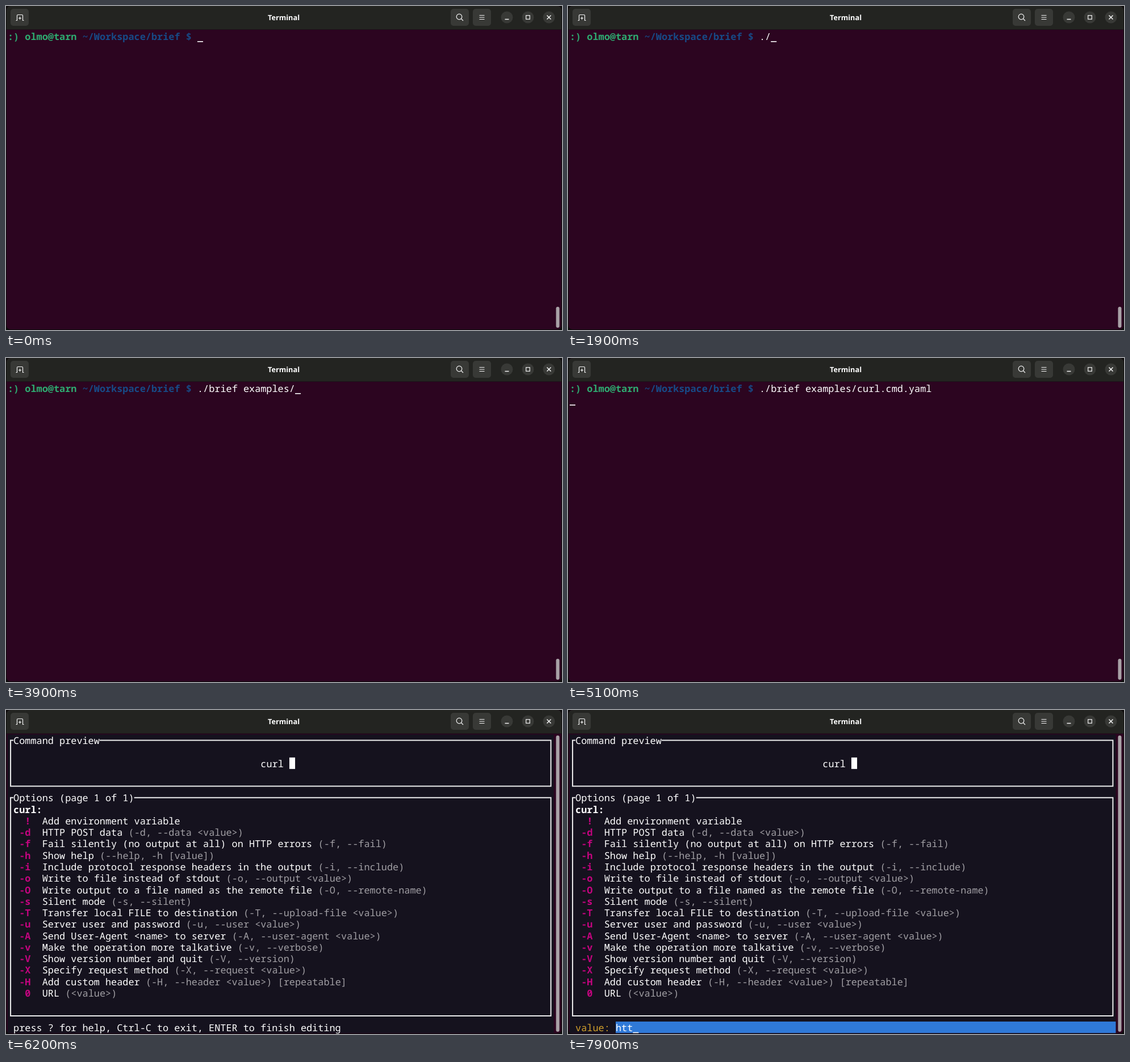
Recreate the animation shown at these times as an HTML page. Size 979x572 px, loop 8 s.

```html
<!DOCTYPE html>
<html lang="en">
<head>
<meta charset="utf-8">
<title>Terminal</title>
<style>
html, body { margin: 0; width: 100%; height: 100%; overflow: hidden; background: #0b0a0a; }
svg { display: block; width: 979px; height: 572px; }
text { white-space: pre; text-rendering: geometricPrecision; }
.mono { font: 500 16.87px "Noto Sans Mono", "DejaVu Sans Mono", monospace; fill: #fff; }
.mono.bold { font-weight: 700; }
.title { font: 700 12.75px "Open Sans", "Noto Sans", sans-serif; fill: #fff; text-anchor: middle; }
.green { fill: #2eaa70; }
.blue { fill: #174a86; }
.pink { fill: #c4047f; }
.grey { fill: #a19fa4; }
.gold { fill: #d2a02c; }
.line { fill: none; stroke: #ededee; stroke-width: 2; }
.icon { fill: none; stroke: #f4f4f4; stroke-width: 1.2; }
</style>
</head>
<body>
<svg viewBox="0 0 979 572">
  <rect x="1" y="0" width="977" height="571" rx="7" fill="#2c0520"/>
  <path d="M1 42V8Q1 0 9 0H970Q978 0 978 8V42Z" fill="#232421"/>
  <rect x="1" y="41" width="977" height="1" fill="#1b1519"/>
  <g fill="#383936">
    <rect x="8" y="5" width="32" height="30" rx="5"/>
    <rect x="783" y="5" width="32" height="30" rx="5"/>
    <rect x="822" y="5" width="32" height="30" rx="5"/>
    <circle cx="882" cy="20" r="10.5"/>
    <circle cx="919" cy="20" r="10.5"/>
    <circle cx="956" cy="20" r="10.5"/>
  </g>
  <g class="icon">
    <path d="M17.5 25.5H19.5V17Q19.5 15.5 21 15.5H28Q29.5 15.5 29.5 17V25.5H31.5M22 21.5H27M24.5 19V24"/>
    <circle cx="798" cy="19" r="4.8"/>
    <path d="M801.5 22.5L805 26M833.5 16.5H842.5M833.5 20H842.5M833.5 23.5H842.5"/>
    <path d="M878.5 23.5H885.5" stroke-width="1.5"/>
    <rect x="915.7" y="16.7" width="6.6" height="6.6"/>
    <path d="M952.5 16.5L959.5 23.5M959.5 16.5L952.5 23.5" stroke-width="1.5"/>
  </g>
  <text class="title" x="489" y="24.5">Terminal</text>
  <g id="shell"></g>
  <g id="menu"></g>
  <rect id="cursor" width="10" height="1.6" fill="#fff"/>
  <rect id="bar" x="968.5" width="6" rx="3" fill="#a9a2a7"/>
</svg>
<script>
const LOOP = 8000, CELL = 10.121, ROW = 20.27, LEFT = 3, TOP = 43.3;
const $ = id => document.getElementById(id);
const colX = c => LEFT + c * CELL;
const rowY = r => TOP + r * ROW;

function add(parent, tag, attrs, content = "") {
  const el = document.createElementNS("http://www.w3.org/2000/svg", tag);
  for (const key in attrs) el.setAttribute(key, attrs[key]);
  el.textContent = content;
  return parent.appendChild(el);
}
const write = (parent, col, row, str, cls = "") =>
  add(parent, "text", { class: "mono " + cls, x: colX(col), y: rowY(row) + 16.7 }, str);
const block = (parent, col, row, cols, rows, fill) =>
  add(parent, "rect", { x: colX(col), y: rowY(row), width: cols * CELL, height: rows * ROW, fill });

// Shell prompt
const shell = $("shell"), menu = $("menu");
write(shell, 0, 0, ":) olmo@tarn", "bold green");
write(shell, 13, 0, "~/Workspace/brief $", "bold blue");
const command = write(shell, 33, 0, "");

// Option menu
block(menu, 0, 0, 95, 26, "#15121e");

function box(top, bottom, label) {
  const l = colX(.5), r = colX(94.5), y = rowY(top + .5), b = rowY(bottom + .5);
  add(menu, "path", {
    class: "line",
    d: `M${colX(1)} ${y}H${l}V${b}H${r}V${y}H${colX(label.length + 1)}`
  });
  write(menu, 1, top, label);
}
box(0, 4, "Command preview");
box(5, 24, "Options (page 1 of 1)");
write(menu, 44, 2, "curl");
block(menu, 49, 2, 1, 1, "#fff");
write(menu, 1, 6, "curl:", "bold");

const options = [
  ["!", "Add environment variable", ""],
  ["-d", "HTTP POST data", "(-d, --data <value>)"],
  ["-f", "Fail silently (no output at all) on HTTP errors", "(-f, --fail)"],
  ["-h", "Show help", "(--help, -h [value])"],
  ["-i", "Include protocol response headers in the output", "(-i, --include)"],
  ["-o", "Write to file instead of stdout", "(-o, --output <value>)"],
  ["-O", "Write output to a file named as the remote file", "(-O, --remote-name)"],
  ["-s", "Silent mode", "(-s, --silent)"],
  ["-T", "Transfer local FILE to destination", "(-T, --upload-file <value>)"],
  ["-u", "Server user and password", "(-u, --user <value>)"],
  ["-A", "Send User-Agent <name> to server", "(-A, --user-agent <value>)"],
  ["-v", "Make the operation more talkative", "(-v, --verbose)"],
  ["-V", "Show version number and quit", "(-V, --version)"],
  ["-X", "Specify request method", "(-X, --request <value>)"],
  ["-H", "Add custom header", "(-H, --header <value>) [repeatable]"],
  ["0", "URL", "(<value>)"]
];
options.forEach(([key, label, flags], i) => {
  write(menu, 4 - key.length, i + 7, key, "bold pink");
  write(menu, 6, i + 7, label);
  write(menu, 7 + label.length, i + 7, flags, "grey");
});

const hint = write(menu, 1, 25, "press ? for help, Ctrl-C to exit, ENTER to finish editing");
const prompt = add(menu, "g", {});
write(prompt, 1, 25, "value:", "gold");
block(prompt, 8, 25, 87, 1, "#2f79d8");
const value = write(prompt, 8, 25, "");

// [time, characters typed]
const LINE = "./brief examples/curl.cmd.yaml ";
const lineKeys = [[0, 0], [1500, 1], [1600, 2], [2100, 3], [2300, 4], [2400, 5], [2500, 6],
  [2800, 8], [3300, 9], [3600, 10], [3700, 11], [3900, 17], [4100, 18], [4200, 19],
  [4300, 20], [4900, 31]];
const valueKeys = [[0, 0], [7500, 1], [7700, 2], [7900, 3]];
const hidden = [[500, 1100], [5200, 6600], [7200, 7500]];
const ENTER = 5100, MENU = 5200, ASK = 6600;

const typed = (keys, t) => keys.filter(k => k[0] <= t).pop()[1];
const show = (el, on) => { el.style.display = on ? "" : "none"; };

function draw(t) {
  const inMenu = t >= MENU, asking = t >= ASK;
  const n = typed(lineKeys, t), v = typed(valueKeys, t);
  command.textContent = LINE.slice(0, n);
  value.textContent = "htt".slice(0, v);
  show(shell, !inMenu);
  show(menu, inMenu);
  show(prompt, asking);
  show(hint, !asking);

  const [col, row] = asking ? [8 + v, 25] : t >= ENTER ? [0, 1] : [33 + n, 0];
  $("cursor").setAttribute("x", colX(col));
  $("cursor").setAttribute("y", rowY(row) + 18.7);
  show($("cursor"), !hidden.some(([a, b]) => t >= a && t < b));

  $("bar").setAttribute("y", inMenu ? 45 : 531);
  $("bar").setAttribute("height", inMenu ? 523 : 37);
}

const start = performance.now();
function tick() {
  draw((performance.now() - start) % LOOP);
  requestAnimationFrame(tick);
}
tick();
</script>
</body>
</html>
```
